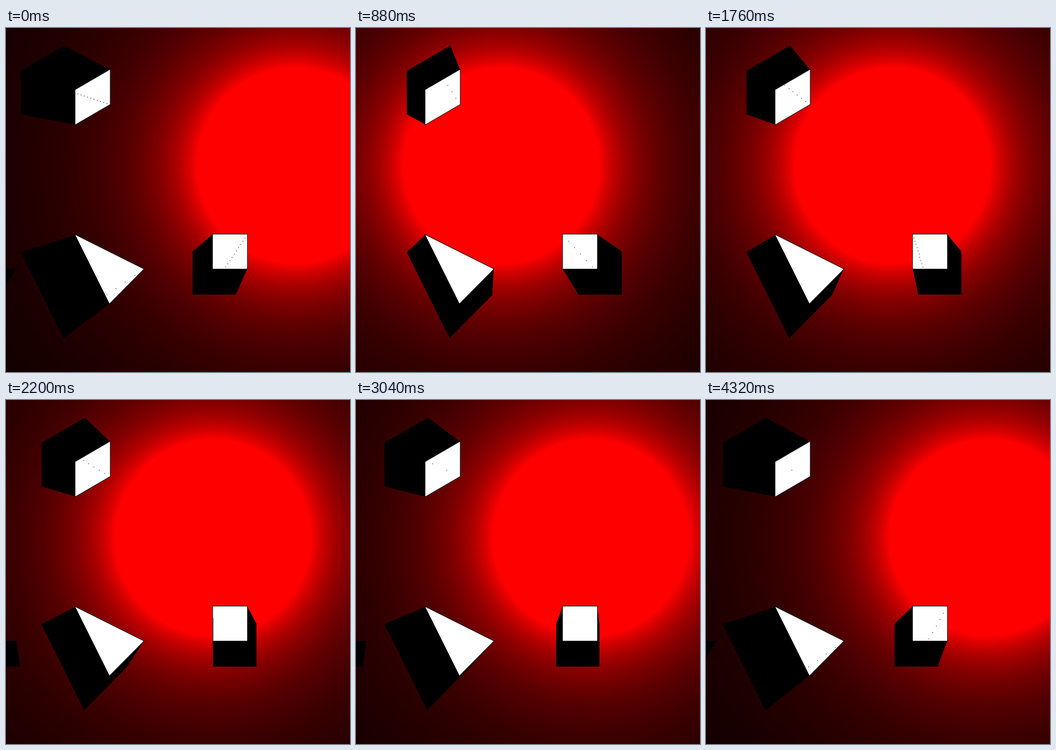
An HTML page with a canvas that plays this animation: 640 px wide and 640 px high, repeating every 4.36 s.

```html
<!DOCTYPE html>
<html>
<head>
<meta charset="utf-8">
<style>
html, body { margin: 0; width: 100%; height: 100%; overflow: hidden; background: #000; }
canvas { display: block; width: 640px; height: 640px; }
</style>
</head>
<body>
<canvas id="stage" width="640" height="640"></canvas>
<script>
const ctx = document.getElementById('stage').getContext('2d');
const LOOP = 4360, STEP = 40, JUMP = 720;
const LIGHT_Y = 256, CORE = 182, REACH = 0.25, CELL = 2;

// time, light x during the long drift to the right
const drift = [[JUMP, 252], [1320, 305], [2200, 381], [3040, 433], [3640, 483], [LOOP, 522]];

// Upright parallelogram: left x, top y, width, height, rise of the right side
const slab = (x, y, w, h, rise) =>
  [[x, y], [x + w, y - rise], [x + w, y - rise + h], [x, y + h]];

const block = slab(129, 115, 64.5, 64.5, 37.5);
const square = slab(384.7, 384, 64, 64, 0);
const wedge = [[129, 385], [256, 448.5], [192.5, 512.5]];

function lightAt(t) {
  if (t < JUMP) return 534 + Math.max(0, t - 320) * 0.085;
  const i = drift.findIndex(p => p[0] > t);
  const [t0, a] = drift[i - 1], [t1, b] = drift[i];
  return a + (b - a) * (t - t0) / (t1 - t0);
}

function trace(points) {
  ctx.beginPath();
  points.forEach(([x, y]) => ctx.lineTo(x, y));
  ctx.closePath();
}

function fill(points, color) {
  trace(points);
  ctx.fillStyle = color;
  ctx.fill();
}

function outlined(points, width) {
  trace(points);
  ctx.strokeStyle = '#000';
  ctx.lineWidth = width;
  ctx.stroke();
  fill(points, '#fff');
}

function glow(x) {
  const far = 900;
  const g = ctx.createRadialGradient(x, LIGHT_Y, 0, x, LIGHT_Y, far);
  g.addColorStop(0, '#f00');
  for (let d = CORE; d <= far; d += d / 25) {
    g.addColorStop(d / far, `rgb(${255 * (CORE / d) ** 2},0,0)`);
  }
  ctx.fillStyle = g;
  ctx.fillRect(0, 0, 640, 640);
}

function shadow(shape, lx) {
  const cast = shape.map(([x, y]) => [x + (x - lx) * REACH, y + (y - LIGHT_Y) * REACH]);
  fill(cast, '#000');
  shape.forEach((p, i) => {
    const j = (i + 1) % shape.length;
    fill([p, shape[j], cast[j], cast[i]], '#000');
  });
}

// Dots where the light ray through a corner lands on whole cells inside the shape
function seam(shape, [x, y], lx) {
  const dy = y - LIGHT_Y, slope = (x - lx) / dy, dir = Math.sign(dy);
  let rows = 1;
  while (rows < 6 && Math.abs(rows * slope - Math.round(rows * slope)) > 0.06) rows++;
  ctx.save();
  trace(shape);
  ctx.clip();
  ctx.fillStyle = '#200';
  for (let s = rows * CELL; s < 66; s += rows * CELL) {
    ctx.fillRect(Math.round(x + dir * s * slope), Math.round(y + dir * s), 1.2, 1.2);
  }
  ctx.restore();
}

function cursor(x, y) {
  const arrow = [[0, 0], [0, 21], [5, 16.5], [8.5, 24.5], [12, 23], [8.5, 15], [15, 15]];
  outlined(arrow.map(([a, b]) => [x + a, y + b]), 2);
}

function draw(t) {
  const lx = lightAt(t);
  glow(lx + 4);

  // Shadow of a body just outside the left edge
  if (lx > 368) {
    fill([[-90, 448], [19, 448], [26 - (lx - 381) * REACH, 496], [-90, 496]], '#000');
  }
  for (const shape of [block, wedge, square]) {
    shadow(shape, lx);
    outlined(shape, 2);
  }

  seam(block, [193, 142], lx);
  seam(wedge, [256, 448], lx);
  seam(square, [lx < 416 ? 384 : 448, 384], lx);

  if (t >= 600 && t < JUMP) cursor(310.5, 323.5);
}

const start = performance.now();
function frame() {
  const t = (performance.now() - start) % LOOP;
  draw(Math.floor(t / STEP) * STEP);
  requestAnimationFrame(frame);
}
frame();
</script>
</body>
</html>
```
